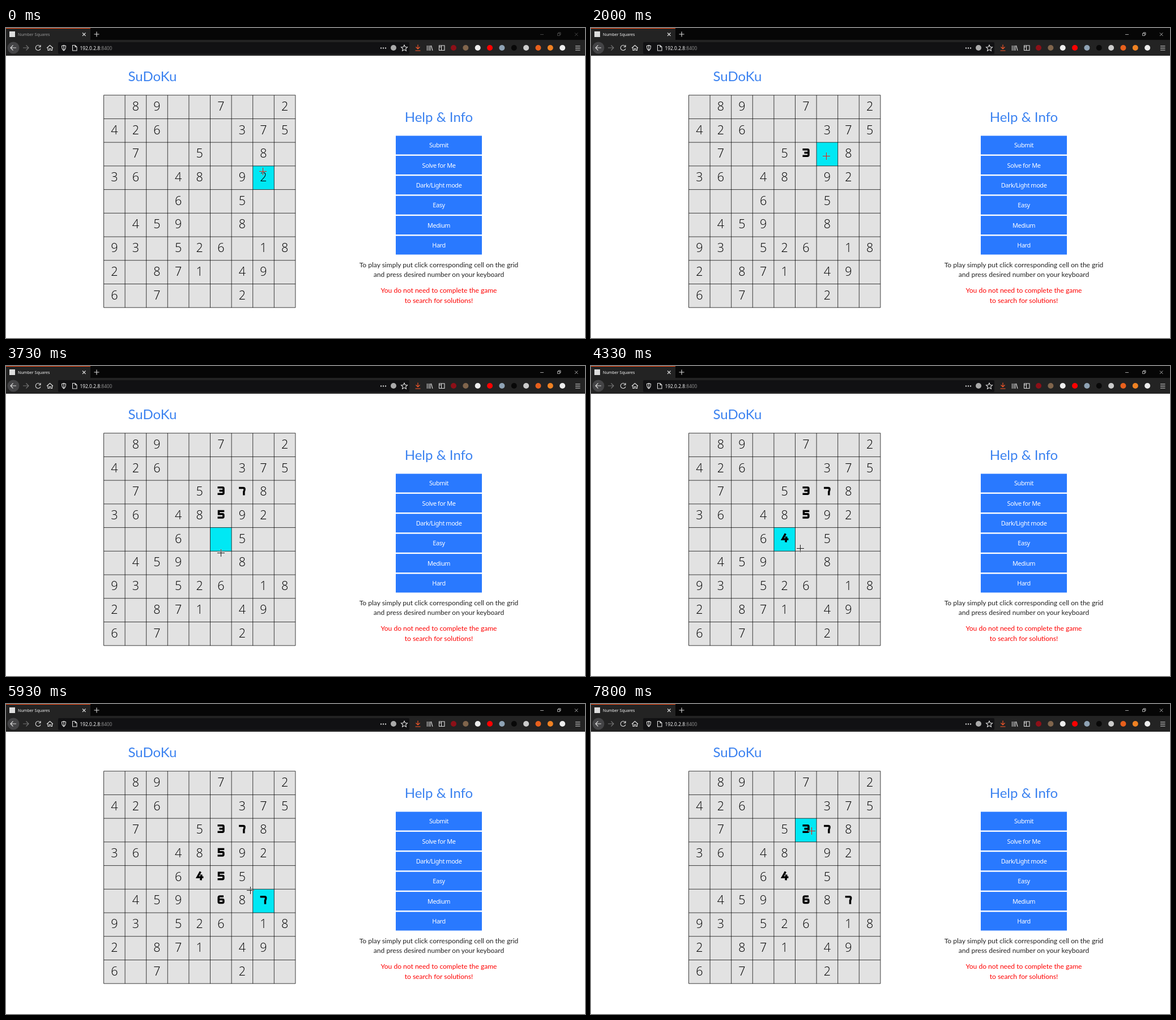
An HTML page for the animation above (8000 ms loop, 1022 by 548 pixels).

```html
<!DOCTYPE html>
<html lang="en">
<head>
<meta charset="utf-8">
<title>Number Squares</title>
<style>
  html, body { margin: 0; width: 100%; height: 100%; overflow: hidden; background: #fff; }
  svg { display: block; width: 100%; height: 100%; }
  .ui { font-family: "Noto Sans", sans-serif; }
  .human { font-family: Lato, sans-serif; text-anchor: middle; }
  .heading { font-size: 24px; fill: #3b82f0; }
  .button { font-size: 10.9px; font-weight: 500; letter-spacing: -.4px; fill: #fff; text-anchor: middle; }
  .note { font-size: 12.05px; fill: #222; }
  .digit { font: 300 21.5px "Open Sans", sans-serif; text-anchor: middle; }
  .icon { fill: none; stroke: #ddd; stroke-width: 1.1; }
  .dim { stroke: #777; }
  .entry { fill: none; stroke: #000; stroke-width: 3.5; }
  #windowButtons { fill: none; stroke-width: .8; }
  #cross { fill: #fff; mix-blend-mode: difference; shape-rendering: crispEdges; }
</style>
</head>
<body>
<svg viewBox="0 0 1022 548" preserveAspectRatio="none">
  <rect width="1022" height="548" fill="#fff"/>
  <g id="browser">
    <rect width="1022" height="22" fill="#060606"/>
    <rect y="21" width="1022" height="28" fill="#232323"/>
    <rect width="149" height="22" fill="#232323"/>
    <rect width="149" height="1" fill="#ff4b12"/>
    <rect x="6" y="6" width="10" height="10" fill="#ddd"/>
    <text id="tabTitle" class="ui" x="21" y="14.3" font-size="7.1">Number Squares</text>
    <path class="icon" d="M135 8.5l5.5 5.5m0-5.5l-5.5 5.5M155.5 11h9M160 6.5v9"/>
    <path id="windowButtons" d="M943 11.5h6M973.5 9.5h4v4h-4zM975 9.5v-1.5h4v4h-1.5M1004 8.5l5.5 5.5m0-5.5l-5.5 5.5"/>
    <rect x="92" y="25" width="620" height="21" rx="2" fill="#111113"/>
    <circle cx="13" cy="35" r="10.5" fill="#444446"/>
    <path class="icon" d="M18 35H8m4.5-4.5L8 35l4.5 4.5"/>
    <path class="icon dim" d="M30 35h10m-4.5-4.5L40 35l-4.5 4.5"/>
    <path class="icon" d="M60.5 32.5a4.5 4.5 0 1 0 .5 4M61 30v3.5h-3.5M72 35.5l5.5-5 5.5 5M74 34.5v5h2.5v-3h2.5v3h2.5v-5"/>
    <path class="icon" d="M102 30.5l3.5 1.2q.3 5.5-3.5 8.3-3.8-2.8-3.5-8.3zM102 31v8M117.500 30.5h4.500l3 3v6.5h-7.500zM122 30.5v3h3"/>
    <text class="ui" x="130.5" y="38.6" font-size="8.4" fill="#f5f5f5">192.0.2.8<tspan fill="#8a8a8a">:8400</tspan></text>
    <path stroke="#ccc" stroke-width="2.4" stroke-linecap="round" stroke-dasharray="0 4" d="M662 35.5h8.1"/>
    <circle cx="684" cy="35" r="5" fill="#aaa"/>
    <path class="icon" d="M703 30l1.6 3.5 3.9.4-2.9 2.6.8 3.9-3.4-2-3.400 2 .8-3.9-2.9-2.6 3.9-.4z"/>
    <path class="icon" style="stroke:#ff5a2a" d="M727 29.5v7.5m-3.500-3.500l3.500 3.500 3.500-3.500M722.5 40h9"/>
    <path class="icon" d="M743.5 31v9M746.5 31v9M749 31v9M750.5 31l2.5 9M764.5 31h9.5v8.5h-9.5zM768.5 31v8.5M765 33.5h2.5"/>
    <path class="icon" d="M1005 32h8.5m-8.5 3.500h8.5m-8.5 3.500h8.5"/>
  </g>
  <text class="human heading" x="258.5" y="93.500">SuDoKu</text>
  <text class="human heading" x="764" y="165.500">Help &amp; Info</text>
  <g id="buttons"></g>
  <g class="human note">
    <text x="764" y="423">To play simply put click corresponding cell on the grid</text>
    <text x="764" y="440">and press desired number on your keyboard</text>
    <g fill="#f00">
      <text x="764" y="468">You do not need to complete the game</text>
      <text x="764" y="486">to search for solutions!</text>
    </g>
  </g>
  <g id="grid" transform="translate(172.5 118.7)">
    <rect width="338.4" height="375.5" fill="#e2e2e2"/>
    <rect id="selection" fill="#00e8f4"/>
  </g>
  <path id="cross" d="M-6 0h13v1h-13zM0-6h1v6h-1zM0 1h1v6h-1z"/>
</svg>
<script>
const LOOP = 8000, STEP = 1000 / 15, FOCUS_AT = 670;
const LEFT = 172.5, TOP = 118.7, CELL_W = 37.6, CELL_H = 41.72;
const $ = id => document.getElementById(id);

function set(node, attrs) {
  for (const key in attrs) node.setAttribute(key, attrs[key]);
  return node;
}

function add(parent, tag, attrs, text = "") {
  const node = set(document.createElementNS("http://www.w3.org/2000/svg", tag), attrs);
  node.textContent = text;
  return parent.appendChild(node);
}

// Cells are named by column letter and row number, "A1" at the top left
function corner(cell) {
  return { x: (cell.charCodeAt(0) - 65) * CELL_W, y: (cell[1] - 1) * CELL_H };
}

const board = [
  ".89..7..2", "426...375", ".7..5..8.",
  "36.48.92.", "...6..5..", ".459..8..",
  "93.526.18", "2.871.49.", "6.7...2.."
];

// Entered digits, drawn around the middle of a cell
const shapes = {
  3: "M-6-5.7H2.5Q4.5-5.7 4.5-4V4Q4.5 5.7 2.5 5.7H-6M-3 0H4.5",
  4: "M1.5-7.5L-4 2.2H6.5M3-2.5L2 7.5",
  5: "M5.8-5.7H-4V-.5H2.5Q4.4-.5 4.4 1.2V4Q4.4 5.7 2.5 5.7H-6",
  6: "M4.5-5.7H-2Q-4.3-5.7-4.3-3.5V4Q-4.3 5.7-2.5 5.7H2.5Q4.4 5.7 4.4 4V1.5Q4.4-.2 2.5-.2H-4",
  7: "M-6-5H1.8Q4-5 4-2.8Q4-.5 2.8 1.5V8"
};

// Click a cell, at an offset from its middle
const click = (at, cell, dx = 2, dy = 4) => {
  const { x, y } = corner(cell);
  return { at, cell, x: LEFT + x + CELL_W / 2 + dx, y: TOP + y + CELL_H / 2 + dy };
};
// Type a digit into the clicked cell; none clears it
const type = (at, digit = "") => ({ at, digit });

const script = [
  click(0, "H4", -1, -11),
  click(330, "F3", 10, 7), click(400, "F3", 6), type(870, 3), type(1470), type(1730, 3),
  click(1200, "F3", 15), click(2000, "G3", -1, 3), type(2470, 7),
  click(2930, "F4", 13, 14), type(3270, 5),
  click(3530, "F5"), click(3800, "F6", 0, -10),
  click(4000, "E5", 17, 16), type(4270, 4),
  click(4470, "F5", 7, 16), type(4670, 5),
  click(4930, "F6"), type(5130, 6),
  click(5530, "H6", -4, -11), type(5800, 7),
  click(6130, "F5"), type(7000),
  click(7270, "F4"), type(7530),
  click(7800, "F3", 10, 1)
].sort((a, b) => a.at - b.at);
const clicks = script.filter(step => step.cell);

["Submit", "Solve for Me", "Dark/Light mode", "Easy", "Medium", "Hard"].forEach((label, i) => {
  const y = 190.5 + 35.4 * i;
  add($("buttons"), "rect", { x: 688, y, width: 152, height: 33, fill: "#2979ff" });
  add($("buttons"), "text", { class: "ui button", x: 764, y: y + 20.7 }, label);
});

["#8d1018", "#80654c", "#eee", "#f00", "#8fa3b5", "#080808", "#ccc", "#e8601c", "#f08223", "#eee"]
  .forEach((fill, i) => add($("browser"), "circle", { cx: 790 + 21.35 * i, cy: 35, r: 5, fill }));

let lines = "";
for (let i = 0; i < 10; i++) lines += `M${i * CELL_W} 0v${9 * CELL_H}M0 ${i * CELL_H}h${9 * CELL_W}`;
add($("grid"), "path", { d: lines, stroke: "#000", "stroke-width": .75 });

const entries = {};
board.forEach((row, r) => [...row].forEach((digit, c) => {
  const cell = String.fromCharCode(65 + c) + (r + 1);
  const { x, y } = corner(cell);
  if (digit === ".") {
    entries[cell] = add($("grid"), "path", { class: "entry", transform: `translate(${x + 19} ${y + 18.4})` });
  } else {
    add($("grid"), "text", { class: "digit", x: x + CELL_W / 2, y: y + 27.2 }, digit);
  }
}));

// Longer moves take longer, up to four steps
function cursorAt(t) {
  const next = clicks.findIndex(step => step.at > t);
  if (next < 0) return clicks[clicks.length - 1];
  const from = clicks[next - 1], to = clicks[next];
  const distance = Math.hypot(to.x - from.x, to.y - from.y);
  const duration = Math.min(4 * STEP, Math.max(STEP, distance * 8));
  const k = Math.max(0, 1 - (to.at - t) / duration);
  return { x: from.x + (to.x - from.x) * k, y: from.y + (to.y - from.y) * k };
}

function render(time) {
  // The picture advances 15 times a second
  const now = Math.floor((time % LOOP + 4) / STEP) * STEP + 4;

  let selected;
  const digits = {};
  for (const step of script) {
    if (step.at > now) break;
    if (step.cell) selected = step.cell;
    else digits[selected] = step.digit;
  }
  set($("selection"), { ...corner(selected), width: CELL_W, height: CELL_H });
  for (const cell in entries) set(entries[cell], { d: shapes[digits[cell]] || "" });

  const focused = now >= FOCUS_AT;
  set($("tabTitle"), { fill: focused ? "#f5f5f5" : "#999" });
  set($("windowButtons"), { stroke: focused ? "#ccc" : "#555" });

  const { x, y } = cursorAt(now);
  set($("cross"), { transform: `translate(${Math.floor(x)} ${Math.floor(y)})` });
}

const start = performance.now();
function frame() {
  render(performance.now() - start);
  requestAnimationFrame(frame);
}
frame();
</script>
</body>
</html>
```
